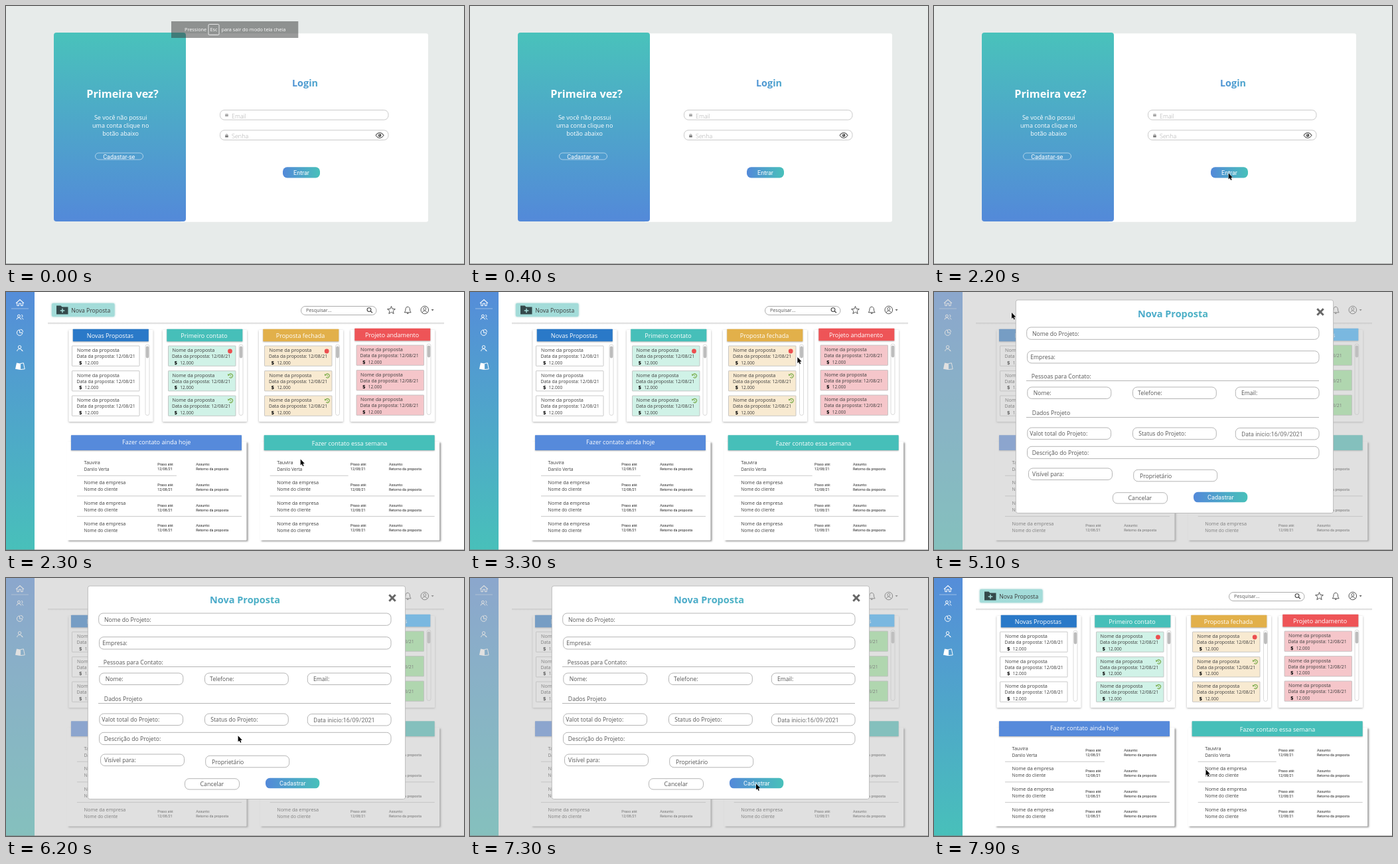
Animation, 690 px wide and 388 px high, one loop 8 s. Source, as an HTML page with a canvas:

```html
<!DOCTYPE html>
<html lang="pt">
<head>
<meta charset="utf-8">
<title>Nova Proposta</title>
<style>
html, body { margin: 0; width: 100%; height: 100%; overflow: hidden; background: #fff; }
canvas { display: block; width: 100vw; height: 100vh; }
</style>
</head>
<body>
<canvas id="stage"></canvas>
<script>
const W = 690, H = 388, LOOP = 8000, STEP = 100;
const canvas = document.getElementById('stage');
const ctx = canvas.getContext('2d');
const ratio = window.devicePixelRatio || 1;
canvas.width = W * ratio;
canvas.height = H * ratio;

const SANS = '"Open Sans", sans-serif';
const ROBOTO = 'Roboto, sans-serif';
const BLUE = '#5389d9', TEAL = '#48c0ba', INK = '#3c3c3c', SOFT = '#555', EDGE = '#a2a2a2';

function text(str, x, y, size, color = INK, { align = 'left', weight = 400, font = SANS } = {}) {
  ctx.font = `${weight} ${size}px ${font}`;
  ctx.textAlign = align;
  ctx.fillStyle = color;
  ctx.fillText(str, x, y);
}

function box(x, y, w, h, r, fill, stroke, lw = 0.8) {
  ctx.beginPath();
  ctx.roundRect(x, y, w, h, r);
  if (fill) { ctx.fillStyle = fill; ctx.fill(); }
  if (stroke) { ctx.strokeStyle = stroke; ctx.lineWidth = lw; ctx.stroke(); }
}

function shadowBox(x, y, w, h, r, fill, dx, dy, blur, shade = 'rgba(0,0,0,.3)') {
  ctx.save();
  ctx.shadowColor = shade;
  ctx.shadowOffsetX = dx * ratio;
  ctx.shadowOffsetY = dy * ratio;
  ctx.shadowBlur = blur * ratio;
  box(x, y, w, h, r, fill);
  ctx.restore();
}

function poly(points, color, lw, close) {
  ctx.beginPath();
  points.forEach(([x, y]) => ctx.lineTo(x, y));
  if (close) ctx.closePath();
  if (lw) { ctx.strokeStyle = color; ctx.lineWidth = lw; ctx.stroke(); }
  else { ctx.fillStyle = color; ctx.fill(); }
}

const rule = (x1, x2, y, color = '#bbb', lw = 0.8) => poly([[x1, y], [x2, y]], color, lw);

function arc(x, y, r, color, lw, from = 0, to = Math.PI * 2) {
  ctx.beginPath();
  ctx.arc(x, y, r, from, to);
  if (lw) { ctx.strokeStyle = color; ctx.lineWidth = lw; ctx.stroke(); }
  else { ctx.fillStyle = color; ctx.fill(); }
}

function blend(x1, y1, x2, y2, from, to) {
  const g = ctx.createLinearGradient(x1, y1, x2, y2);
  g.addColorStop(0, from);
  g.addColorStop(1, to);
  return g;
}

// Login screen
function eye(x, y) {
  ctx.beginPath();
  ctx.moveTo(x - 6, y);
  ctx.quadraticCurveTo(x, y - 8, x + 6, y);
  ctx.quadraticCurveTo(x, y + 8, x - 6, y);
  ctx.strokeStyle = '#555';
  ctx.lineWidth = 1.1;
  ctx.stroke();
  arc(x, y, 2.4, '#555');
  arc(x - 0.7, y - 0.8, 0.7, '#fff');
}

function login() {
  ctx.fillStyle = '#e7ebea';
  ctx.fillRect(0, 0, W, H);
  box(262, 41.3, 374, 283.5, 3, '#fff');
  box(72, 40, 199, 284, 4, blend(0, 40, 0, 324, '#49c2bb', BLUE));
  text('Primeira vez?', 175.5, 138, 16.25, '#fff', { align: 'center', weight: 700 });
  ['Se você não possui', 'uma conta clique no', 'botão abaixo'].forEach((line, i) =>
    text(line, 172.7, 171 + i * 12.2, 9, '#fff', { align: 'center' }));
  box(134.5, 221, 72, 10, 5, null, 'rgba(255,255,255,.75)', 0.7);
  text('Cadastar-se', 170.3, 230, 9, '#fff', { align: 'center', font: ROBOTO });

  text('Login', 450.5, 120.5, 14.4, blend(431, 0, 470, 0, '#4f93d4', '#4ba5cc'), { align: 'center', weight: 700 });
  [['Email', 156.5], ['Senha', 186.8]].forEach(([label, y]) => {
    box(322.5, y, 253.5, 14.7, 6.5, '#fff', '#bdbdbd');
    text(label, 340, y + 12.4, 9, '#aaa', { weight: 300 });
  });
  box(330.2, 162.3, 4.6, 3.8, 0.6, '#999');
  rule(330.4, 334.6, 163.7, '#fff', 0.5);
  box(330.2, 194.4, 4.6, 3.2, 0.5, '#777');
  arc(332.5, 194.3, 1.5, '#777', 0.8, Math.PI, 0);
  eye(563, 194.5);
  box(417, 242.3, 56, 16.2, 6.5, blend(417, 0, 473, 0, BLUE, TEAL));
  text('Entrar', 445, 253.5, 9, '#fff', { align: 'center', font: ROBOTO });
}

function banner(alpha) {
  ctx.save();
  ctx.globalAlpha = alpha;
  box(249, 23, 191.3, 25, 0, 'rgba(55,56,57,.5)');
  text('Pressione', 269, 38.3, 7.3, '#fff');
  box(305, 27.5, 16, 16, 1.5, null, '#fff', 0.8);
  text('Esc', 313, 38.3, 7.3, '#fff', { align: 'center' });
  text('para sair do modo tela cheia', 324.5, 38.3, 7.3, '#fff');
  ctx.restore();
}

// Dashboard
function person(x, y, s, color, lw) {
  arc(x, y - 2 * s, 2 * s, color, lw);
  arc(x, y + 4.2 * s, 3.6 * s, color, lw, Math.PI * 1.05, Math.PI * 1.95);
}

function sidebar() {
  ctx.fillStyle = blend(0, 0, 0, H, '#558dd9', TEAL);
  ctx.fillRect(0, 0, 43, H);
  poly([[15, 16.8], [21, 11.5], [27, 16.8]], '#fff', 1.1);
  poly([[16.8, 15.6], [16.8, 20.6], [19.5, 20.6], [19.5, 17.2], [22.5, 17.2], [22.5, 20.6], [25.2, 20.6], [25.2, 15.6]], '#fff', 1);
  rule(8, 34, 25, 'rgba(255,255,255,.6)', 0.7);
  person(19.4, 38, 0.95, '#fff', 1);
  arc(23.2, 36.2, 1.8, '#fff', 0.9, -1.6, 1.5);
  arc(23, 42, 3, '#fff', 0.9, -1.2, -0.2);
  arc(20.6, 61.2, 4.2, '#fff', 1, 0, Math.PI * 1.5);
  poly([[20.6, 57], [20.6, 61.2], [24.8, 61.2]], '#fff', 1);
  arc(21.6, 60.2, 4, '#fff', 1, -Math.PI / 2, 0);
  person(20.6, 85, 1.1, '#fff', 1);
  poly([[23.4, 86.6], [25.4, 89.2]], '#fff', 1);
  poly([[16, 106.6], [21.3, 107.6], [21.3, 117], [14, 115.8]], '#fff', 0, true);
  poly([[21.6, 107.6], [26.4, 106.8], [28.2, 115.8], [21.6, 116.6]], '#fff', 1, true);
}

function newButton() {
  shadowBox(69, 17, 94.5, 20, 2, '#a3dcd9', 0, 0, 3, 'rgba(60,160,155,.6)');
  poly([[76, 20.5], [82.5, 20.5], [84.5, 22.5], [93.5, 22.5], [93.5, 33.5], [76, 33.5]], '#34494b', 0, true);
  rule(81.7, 88.3, 28, '#a3dcd9', 1.5);
  poly([[85, 24.8], [85, 31.2]], '#a3dcd9', 1.5);
  text('Nova Proposta', 98.3, 30.7, 8.6);
}

function header(dim) {
  ctx.fillStyle = blend(0, 46, 0, 49, '#d2d2d2', '#fff');
  ctx.fillRect(63, 46, 597, 3);
  if (!dim) newButton();
  box(444.5, 21.5, 113.5, 13, 6.5, '#fff', '#999');
  text('Pesquisar...', 452, 30.3, 7.2, SOFT);
  arc(547, 26.6, 2.9, '#444', 1.1);
  poly([[549.2, 28.8], [552, 31.3]], '#444', 1.3);
  const star = Array.from({ length: 10 }, (_, i) => {
    const a = -Math.PI / 2 + i * Math.PI / 5, r = i % 2 ? 2.7 : 6.2;
    return [580.5 + r * Math.cos(a), 27.6 + r * Math.sin(a)];
  });
  poly(star, SOFT, 1, true);
  ctx.beginPath();
  ctx.moveTo(600.3, 30.8);
  ctx.quadraticCurveTo(602, 29, 602, 26);
  ctx.bezierCurveTo(602, 21, 608.4, 21, 608.4, 26);
  ctx.quadraticCurveTo(608.4, 29, 610.1, 30.8);
  ctx.closePath();
  ctx.strokeStyle = SOFT;
  ctx.lineWidth = 1;
  ctx.stroke();
  arc(605.2, 31.6, 1.5, SOFT, 0, 0, Math.PI);
  arc(630.8, 27, 5.8, SOFT, 1);
  arc(630.8, 25.3, 2, SOFT, 0.9);
  arc(630.8, 32, 3.7, SOFT, 0.9, Math.PI * 1.1, Math.PI * 1.9);
  poly([[640.6, 26], [644.6, 26], [642.6, 28.4]], '#666', 0, true);
}

function history(x, y) {
  const green = '#79aa48';
  arc(x + 0.4, y, 3, green, 1.1, -2.6, 2.3);
  poly([[x - 4, y - 3], [x - 3.6, y + 0.2], [x - 0.8, y - 1]], green, 0, true);
  poly([[x + 0.3, y - 1.6], [x + 0.3, y + 0.3], [x + 1.7, y + 1]], green, 0.8);
}

function card(x, y, tx, fill) {
  box(x, y, 101.5, 30.3, 0.5, fill, '#bbb', 0.8);
  text('Nome da proposta', tx + 0.6, y + 9.2, 7.3);
  text('Data da proposta: 12/08/21', tx, y + 18.4, 6.9);
  text('$', tx + 3.8, y + 27.6, 7, '#111', { weight: 800 });
  text('12.000', tx + 12.3, y + 27.6, 6.5);
}

const columns = [
  { x: 94.5, title: 'Novas Propostas', color: '#2a79c8', fill: '#fff', card: 99.5, tx: 106.5, bar: 210, top: 81 },
  { x: 236, title: 'Primeiro contato', color: '#46bfb9', fill: '#d0f2e7', card: 244.5, tx: 250, bar: 351, top: 81, marks: 337.5 },
  { x: 381, title: 'Proposta fechada', color: '#e2b04a', fill: '#f8ead1', card: 389.5, tx: 396, bar: 496.5, top: 81, marks: 483.2 },
  { x: 519, title: 'Projeto andamento', color: '#ee5457', fill: '#f5c6ca', card: 528, tx: 533.5, bar: 634, top: 80 }
];

// Columns as they stand behind the form
const dimColumns = [
  { ...columns[0], headX: 98 },
  columns[1],
  columns[2],
  { ...columns[3], title: 'Finalizadas', color: '#33afff', fill: '#9feb9d', tx: 526.5 }
];

function column(c) {
  shadowBox(c.x, 57, 127, 138, 1, '#fff', 0, 1, 3);
  shadowBox(c.headX || c.x + 6.3, c.top - 25.2, 114, 18.4, 0.5, c.color, 0, 1, 2);
  text(c.title, c.x + 62.5, c.top - 11.8, 9, '#fff', { align: 'center' });
  [0, 37.6, 75].forEach((dy, i) => {
    card(c.card, c.top + dy, c.tx, c.fill);
    if (!c.marks) return;
    if (i) history(c.marks + 0.6, c.top + dy + 7.4);
    else arc(c.marks, 89, 3.4, '#ec4f50');
  });
  box(c.bar, c.top - 2, 6, 106.5, 3, '#fff', '#ccc', 0.7);
  box(c.bar + 0.6, c.top + 0.5, 4.8, 18, 2.4, '#bdbdbd');
}

function table(x, title, color, titleY, firstRule) {
  shadowBox(x, 225, 270.5, 148.5, 1, '#fff', 2, 1.5, 2.5, 'rgba(0,0,0,.4)');
  shadowBox(x + 6, 215.3, 257, 22.7, 0.5, color, 0, 1, 2);
  text(title, x + 134.7, titleY, 9, '#fff', { align: 'center' });
  for (let i = 0; i < 4; i++) {
    const y = 258.6 + i * 30.8;
    text(i ? 'Nome da empresa' : 'Tauvira', x + 25.5, y, 7.3);
    text(i ? 'Nome do cliente' : 'Danilo Verta', x + 25.5, y + 10, 6.65);
    [['Praso até:', 136.3, 2.3], ['12/08/21', 136.3, 9.4], ['Assunto:', 194.2, 2.3], ['Retorno da proposta', 194.2, 9.4]]
      .forEach(([s, dx, dy]) => text(s, x + dx, y + dy, 5.4, '#222', { font: ROBOTO }));
    if (i < 3) rule(x + 15, x + (i ? 263 : firstRule), 276.2 + i * 30.6);
  }
}

function dashboard(dim) {
  ctx.fillStyle = '#fff';
  ctx.fillRect(0, 0, W, H);
  sidebar();
  header(dim);
  (dim ? dimColumns : columns).forEach(column);
  table(92, 'Fazer contato ainda hoje', '#568adb', 229, 165);
  table(382.7, 'Fazer contato essa semana', '#46bfb9', 230.7, 133);
}

// Proposal form
const fields = [
  ['Nome do Projeto:', 139.7, 53, 440.3, 148],
  ['Empresa:', 140.5, 88.7, 439.5, 145.3],
  ['Nome:', 140.8, 143, 126, 149.8],
  ['Telefone:', 299.5, 143, 125.8, 307],
  ['Email:', 454.3, 143, 125.8, 463],
  ['Valot total do Projeto:', 140.8, 204, 125.8, 144.2],
  ['Status do Projeto:', 299.5, 204, 125.8, 308.3],
  ['', 454.3, 204.5, 125.8, 463],
  ['Descrição do Projeto:', 140.5, 232.3, 439.5, 147.8],
  ['Visível para:', 142.5, 265, 126, 148],
  ['Proprietário', 300.7, 267.3, 126, 310]
];

function modal() {
  dashboard(true);
  ctx.fillStyle = 'rgba(193,193,193,.5)';
  ctx.fillRect(0, 0, W, H);
  box(123.3, 12, 478.3, 320.5, 3, '#fff', '#b0b0b0');
  text('Nova Proposta', 360, 38.3, 14.5, blend(307, 0, 413, 0, '#4aa9ca', '#4eb3c4'), { align: 'center', weight: 700 });
  poly([[577.3, 25.3], [586.7, 34.7]], '#666', 3);
  poly([[586.7, 25.3], [577.3, 34.7]], '#666', 3);
  fields.forEach(([label, x, y, w, tx]) => {
    const wide = w > 200;
    box(x, y, w, wide ? 18.3 : 17.5, 6.5, '#fff', EDGE);
    text(label, tx, y + (wide ? 12.5 : 12.2), 8.65, SOFT);
  });
  text('Data inicio:16/09/2021', 463.3, 217, 9, '#707070', { font: ROBOTO });
  text('Pessoas para Contato:', 146.8, 130, 8.7, SOFT);
  rule(139, 580, 133.5, EDGE);
  text('Dados Projeto', 147.8, 185.3, 8.7, SOFT);
  rule(139, 580, 188.5, EDGE);
  box(269.5, 301.7, 82, 16.3, 6.5, '#fff', EDGE);
  text('Cancelar', 310.3, 313, 8.8, SOFT, { align: 'center' });
  box(391, 300.8, 81.3, 15.5, 6.5, blend(391, 0, 472, 0, BLUE, TEAL));
  text('Cadastrar', 431.8, 311.7, 9.1, '#fff', { align: 'center', font: ROBOTO });
}

// Pointer: [time, x, y]
const track = [
  [1300, 666, 209], [1900, 443.7, 251.5], [2500, 443.7, 251.5],
  [3000, 128, 44], [3400, 561, 108], [3600, 592, 125],
  [4200, 117, 31], [5600, 117, 31], [6500, 431, 309.5],
  [7800, 431, 309.5], [7900, 409.5, 288], [8000, 409.5, 288]
];

function pointerAt(t) {
  const i = track.findIndex(k => k[0] > t);
  const [t0, x0, y0] = track[i - 1], [t1, x1, y1] = track[i];
  const p = (t - t0) / (t1 - t0), e = p * p * (3 - 2 * p);
  return [x0 + (x1 - x0) * e, y0 + (y1 - y0) * e];
}

function arrow() {
  const shape = [[0, 0], [0, 9], [2, 7.2], [3.5, 10.4], [4.9, 9.8], [3.5, 6.7], [6.2, 6.5]];
  poly(shape, 'rgba(255,255,255,.8)', 1, true);
  poly(shape, '#000', 0, true);
}

function hand() {
  const shape = [[-1, 0.5], [0, 0], [1, 0.5], [1, 4], [4.6, 5.2], [5, 6.5], [4.2, 10], [3.6, 12.5], [-1.4, 12.5], [-4, 8.2], [-3.6, 6.8], [-1, 8.2]];
  poly(shape, '#fff', 1, true);
  poly(shape, '#111', 0, true);
}

function pointer(t) {
  if (t < track[0][0]) return;
  const [x, y] = pointerAt(t);
  const onButton = t > 3600 && t < 5100 && x > 69 && x < 163 && y > 17 && y < 37;
  ctx.save();
  ctx.translate(x, y);
  (onButton ? hand : arrow)();
  ctx.restore();
}

function draw(t) {
  ctx.setTransform(ratio, 0, 0, ratio, 0, 0);
  if (t < 2300) login();
  else if (t >= 5100 && t < 7400) modal();
  else dashboard(false);
  if (t < 400) banner(1 - t / 400);
  ctx.fillStyle = 'rgba(120,120,120,.55)';
  ctx.fillRect(0, 387, W, 1);
  pointer(t);
}

const start = performance.now();
function tick() {
  const t = (performance.now() - start) % LOOP;
  draw(Math.floor(t / STEP) * STEP);
  requestAnimationFrame(tick);
}
tick();
</script>
</body>
</html>
```
